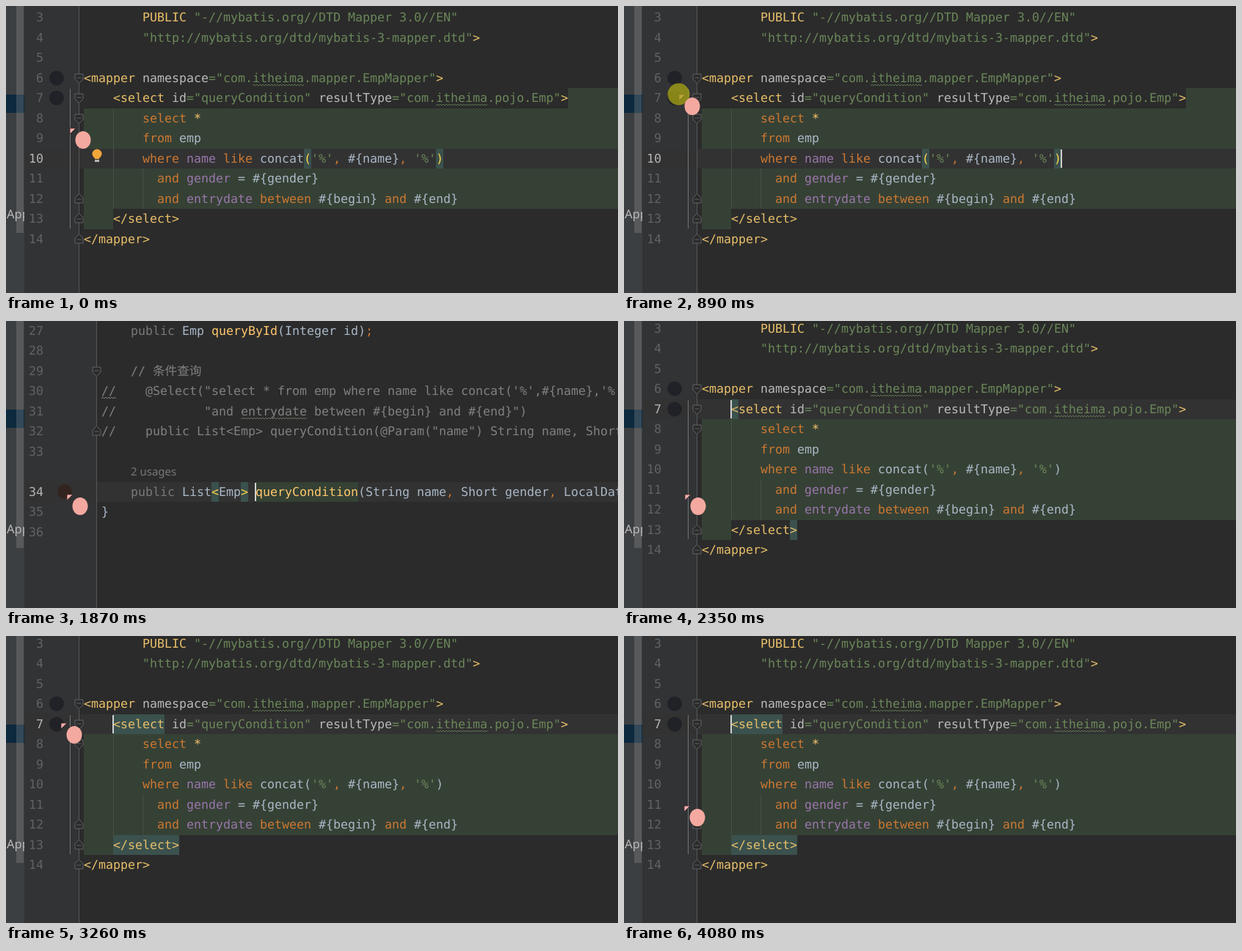
Write an HTML page that moves like this. It is 834x392 px and loops after 4.15 s.

```html
<!DOCTYPE html>
<html lang="en">
<head>
<meta charset="utf-8">
<title>Jumping between mapper and XML</title>
<style>
  html, body { margin: 0; width: 100%; height: 100%; overflow: hidden; background: #2b2b2b; }
  svg { display: block; width: 834px; height: 392px; }
  rect { shape-rendering: crispEdges; }
  text { white-space: pre; text-rendering: geometricPrecision; }
  .code { font: 16.61px "DejaVu Sans Mono", "Noto Sans CJK SC", monospace; }
  .ui { font-family: "Noto Sans", sans-serif; }
</style>
</head>
<body>
<svg id="stage" viewBox="0 0 834 392"></svg>
<script>
const NS = "http://www.w3.org/2000/svg";
const stage = document.getElementById("stage");
const LOOP = 4150, CHAR = 10, ROW = 27.5, BASE = 19;

// Colour keys used in the code lines: "~k" switches to colour k
const INK = {
  y: "#e8bf6a", g: "#6a8759", n: "#bababa", k: "#cc7832", t: "#a9b7c6",
  p: "#9876aa", f: "#ffc66d", c: "#808080", d: "#787878", b: "#ffd34a"
};
const GREEN = "#364135", MATCH = "#3b514d", CURRENT = "#323232";

function add(parent, tag, attrs, content) {
  const el = document.createElementNS(NS, tag);
  for (const key in attrs) el.setAttribute(key, attrs[key]);
  if (content) el.textContent = content;
  parent.appendChild(el);
  return el;
}
const rect = (g, x, y, width, height, fill) => add(g, "rect", { x, y, width, height, fill });
const line = (g, x, y1, y2, stroke) => add(g, "path", { d: `M${x} ${y1}V${y2}`, stroke });
const dot = (g, cx, cy, r, fill) => add(g, "circle", { cx, cy, r, fill });
const group = parent => add(parent, "g", {});

function code(g, left, top, source) {
  let col = 0;
  for (const part of source.split("~").slice(1)) {
    const text = part.slice(1);
    const lead = text.length - text.trimStart().length;
    const bold = part[0] === "b" ? "bold" : "normal";
    add(g, "text", {
      class: "code", x: left + (col + lead) * CHAR, y: top + BASE,
      fill: INK[part[0]], "font-weight": bold
    }, text.trim());
    col += text.length;
  }
}

function lineNumber(g, n, top, current) {
  add(g, "text", {
    class: "code", x: 51, y: top + BASE, "text-anchor": "end",
    fill: current ? "#b4b4b4" : "#606366"
  }, String(n));
}

function wave(g, x, y, width, stroke) {
  let d = `M${x} ${y + 1}`;
  for (let i = 2; i <= width; i += 2) d += `L${x + i} ${y + (i % 4 ? -1 : 1)}`;
  add(g, "path", { d, stroke, fill: "none", "stroke-width": 0.9 });
}

function fold(g, x, y, dir) {
  const s = dir === "down" ? 1 : -1;
  add(g, "path", {
    d: `M${x - 5.5} ${y - 6 * s}h11v${7 * s}l-5.5 ${5.5 * s}l-5.5 ${-5.5 * s}z`,
    fill: "#2b2b2b", stroke: "#606366"
  });
  add(g, "path", { d: `M${x - 3} ${y - s}h6`, stroke: "#606366" });
}

function caretAt(g, x, top) {
  return rect(g, x - 1, top + 1, 2, 25, "#d0d0d0");
}

const XML = [
  '~y        PUBLIC ~g"-//mybatis.org//DTD Mapper 3.0//EN"',
  '~g        "http://mybatis.org/dtd/mybatis-3-mapper.dtd"~y>',
  '',
  '~y<mapper ~nnamespace~g="com.itheima.mapper.EmpMapper"~y>',
  '~y    <select ~nid~g="queryCondition" ~nresultType~g="com.itheima.pojo.Emp"~y>',
  '~k        select ~f*',
  '~k        from ~temp',
  '~k        where ~pname ~klike ~tconcat(~g\'%\'~k, ~t#{name}~k, ~g\'%\'~t)',
  '~k          and ~pgender ~t= #{gender}',
  '~k          and ~pentrydate ~kbetween ~t#{begin} ~kand ~t#{end}',
  '~y    </select>',
  '~y</mapper>'
];

const JAVA = [
  '~d    public ~tEmp ~fqueryById~t(Integer id)~k;',
  '',
  '~c    // 条件查询',
  '~c//    @Select("select * from emp where name like concat(\'%\',#{name},\'%\')',
  '~c//            "and entrydate between #{begin} and #{end}")',
  '~c//    public List<Emp> queryCondition(@Param("name") String name, Short gender',
  '',
  '~d    public ~tList~b<~tEmp~b> ~fqueryCondition~t(String name~k, ~tShort gender~k, ~tLocalDate begin',
  '~t}',
  ''
];

function gutter(g, edge) {
  rect(g, 25, 0, edge - 25, 392, "#313335");
}

function xmlScene(shift, current) {
  const g = group(stage), left = 106;
  const top = n => Math.round(194.5 + shift + (n - 10) * ROW);
  const x = col => left + col * CHAR;
  const band = (from, to, x1, x2, fill) => rect(g, x1, top(from), x2 - x1, top(to) - top(from), fill);
  gutter(g, 99);
  band(7, 8, x(66), 834, GREEN);
  band(8, 13, left, 834, GREEN);
  band(13, 14, left, x(4), GREEN);
  band(current, current + 1, 25, 834, CURRENT);
  line(g, 146.5, top(8), top(13), "#465044");
  line(g, 186.5, top(11), top(13), "#465044");
  line(g, 99.5, 0, 392, "#555759");
  line(g, 87.5, top(7) + 1, top(14) - 1, "#717375");

  const brackets = group(g), tags = group(g);
  const mark = (to, n, col, len) => rect(to, x(col), top(n), len * CHAR, top(n + 1) - top(n), MATCH);
  if (current === 10) {
    mark(brackets, 10, 30, 1);
    mark(brackets, 10, 48, 1);
  } else {
    mark(brackets, 7, 4, 1);
    mark(brackets, 13, 12, 1);
    mark(tags, 7, 4, 7);
    mark(tags, 13, 4, 9);
  }
  XML.forEach((source, i) => {
    const n = i + 3;
    if (n === 10 && current === 10) source = source.replace("concat(", "concat~b(").replace("~t)", "~b)");
    lineNumber(g, n, top(n), n === current);
    code(g, left, top(n), source);
  });
  wave(g, x(23), top(6) + 23, 70, "#628255");
  wave(g, x(48), top(7) + 23, 70, "#628255");
  for (const n of [6, 7, 8]) fold(g, 99.5, top(n) + 14, "down");
  for (const n of [12, 13, 14]) fold(g, 99.5, top(n) + 13, "up");
  for (const n of [6, 7]) dot(g, 69, top(n) + 13.5, 10, "#202227");
  const caret = current === 10 ? caretAt(g, x(49), top(10)) : caretAt(g, x(4), top(7));
  return { g, caret, tags };
}

function javaScene() {
  const g = group(stage), left = 130;
  const top = n => Math.round((n - 27) * ROW + (n > 33 ? ROW : 0) - 0.4);
  const x = col => left + col * CHAR;
  const mark = (x1, x2, fill) => rect(g, x1, top(34), x2 - x1, top(35) - top(34), fill);
  gutter(g, 123);
  mark(25, 834, CURRENT);
  line(g, 123.5, 0, 392, "#555759");
  mark(x(15), x(16), MATCH);
  mark(x(19), x(20), MATCH);
  mark(x(21), x(35), "#344134");
  JAVA.forEach((source, i) => {
    const n = i + 27;
    lineNumber(g, n, top(n), n === 34);
    code(g, left, top(n), source);
  });
  add(g, "text", { class: "ui", x: 170, y: 211, "font-size": 15, fill: "#787878" }, "2 usages");
  wave(g, 130, top(30) + 23, 20, "#8a8a80");
  wave(g, x(19), top(31) + 23, 90, "#737a68");
  fold(g, 123.5, top(29) + 14, "down");
  fold(g, 123.5, top(32) + 13, "up");
  dot(g, 80, 233, 10, "#33241f");
  return { g, caret: caretAt(g, x(21), top(34)) };
}

const first = xmlScene(0, 10);
const java = javaScene();
const second = xmlScene(-5.2, 7);

const bulb = group(first.g);
dot(bulb, 124, 202, 6.5, "#f2a73b");
rect(bulb, 121, 207, 6, 2, "#f2a73b");
rect(bulb, 121, 210, 6, 3, "#b5b7b9");

// Project panel on the left edge
const panel = group(stage);
rect(panel, 0, 0, 25, 392, "#3c3f41");
rect(panel, 0, 121, 25, 25, "#0d293e");
add(panel, "clipPath", { id: "edge" }).append(rect(panel, 0, 0, 25, 392, "#000"));
add(panel, "text", {
  class: "ui", x: 1, y: 290, "font-size": 16.5, fill: "#bbbbbb", "clip-path": "url(#edge)"
}, "App");
add(panel, "rect", { x: 14, y: 0, width: 10, height: 310, fill: "#a6a6a6", "fill-opacity": 0.25 });

const pointer = group(stage);
add(pointer, "path", { d: "M0 0H8L0 8Z", fill: "#f5b0ae", stroke: "#3a2626", "stroke-width": 0.8 });
const press = dot(pointer, -0.5, -0.5, 15, "rgba(170,165,20,.75)");
add(pointer, "ellipse", { cx: 18, cy: 16, rx: 10.5, ry: 12, fill: "#f4a9a0" });

// [start, end, steps, x, y]: each step is a hard jump toward the end point
const MOVES = [
  [50, 390, 6, 75, 121],
  [1450, 1660, 4, 82, 235],
  [1800, 1870, 2, 83, 237],
  [2560, 3040, 8, 75, 121],
  [3110, 3180, 2, 75, 119],
  [3450, 3510, 2, 80, 229],
  [3590, 3590, 1, 82, 232]
];
const CLICKS = [[820, 960], [2220, 2350], [3310, 3450], [3940, 4080]];
const CARET_OFF = [[0, 180], [680, 820], [1450, 1870], [2830, 3250]];
const within = (spans, t) => spans.some(([a, b]) => t >= a && t < b);
const ease = u => u * u * (3 - 2 * u);

function position(t) {
  let x = 87, y = 167;
  for (const [start, end, steps, toX, toY] of MOVES) {
    if (t < start) break;
    const gap = steps > 1 ? (end - start) / (steps - 1) : 1;
    const done = Math.min(steps, Math.floor((t - start) / gap + 0.01) + 1);
    const u = ease(done / steps);
    x += (toX - x) * u;
    y += (toY - y) * u;
  }
  return [x, y];
}

const show = (el, on) => el.setAttribute("visibility", on ? "inherit" : "hidden");

function draw(t) {
  const scene = t < 960 ? first : t < 2350 ? java : t < 3450 ? second : t < 4080 ? java : second;
  for (const s of [first, java, second]) {
    show(s.g, s === scene);
    show(s.caret, !within(CARET_OFF, t));
  }
  show(bulb, t < 820);
  show(second.tags, t >= 2560);
  show(press, within(CLICKS, t));
  pointer.setAttribute("transform", `translate(${position(t)})`);
}

const begin = performance.now();
function tick() {
  draw((performance.now() - begin) % LOOP);
  requestAnimationFrame(tick);
}
tick();
</script>
</body>
</html>
```
